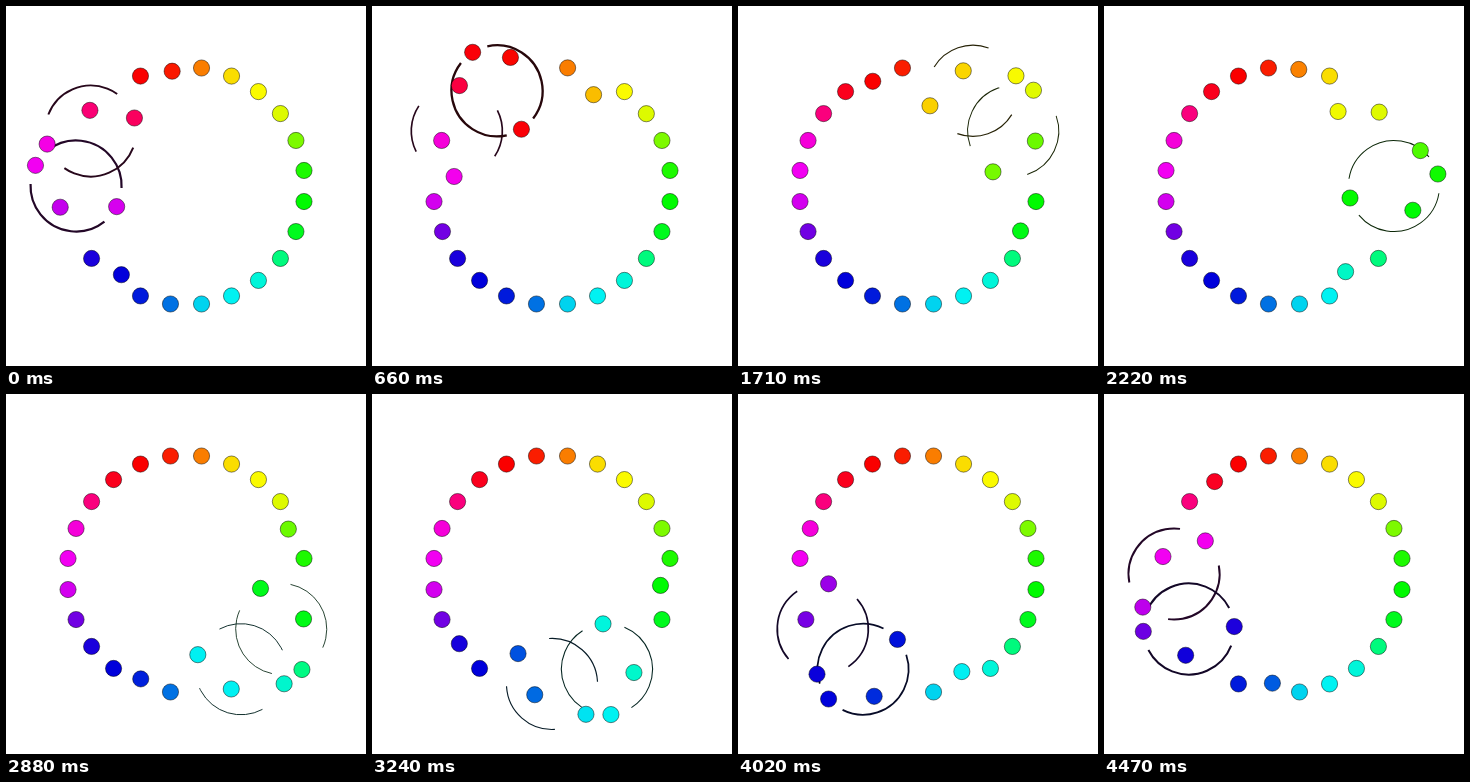
Write an HTML page with a canvas that moves like this. It is 360 by 360 pixels and loops after 4.5 s.

```html
<!DOCTYPE html>
<html lang="en">
<head>
<meta charset="utf-8">
<title>Swapping dots</title>
<style>
  html, body { margin: 0; width: 100%; height: 100%; overflow: hidden; background: #fff; }
  canvas { display: block; width: 360px; height: 360px; }
</style>
</head>
<body>
<canvas id="stage" width="360" height="360"></canvas>
<script>
const ctx = document.getElementById("stage").getContext("2d");

const LOOP = 4500, TICK = 30;
const CENTER = 180, RING = 119, DOT = 8.5;
const PAIRS = 12;
const STAGGER = 4470 / 11;      // delay between neighbouring pairs
const SWAP = 1733;              // time one pair takes to trade places
const LEAD = 0.5815 * SWAP;     // progress of the leftmost pair at time 0

const rad = degrees => degrees * Math.PI / 180;
const cosDeg = degrees => Math.cos(rad(degrees));
const sinDeg = degrees => Math.sin(rad(degrees));
const mod = (a, n) => ((a % n) + n) % n;
const easeInOut = u => u < 0.5 ? 2 * u * u : 1 - 2 * (1 - u) ** 2;

// Each pair sits 45° apart on the ring and turns about its midpoint.
const ORBIT = RING * cosDeg(22.5);
const RADIUS = RING * sinDeg(22.5);

function pairAt(index, time) {
  const angle = 180 + index * 360 / PAIRS;
  const elapsed = mod(time + LEAD - index * STAGGER, PAIRS * STAGGER);
  const progress = Math.min(elapsed / SWAP, 1);
  return {
    angle,
    progress,
    turn: easeInOut(progress),
    x: CENTER + ORBIT * cosDeg(angle),
    y: CENTER + ORBIT * sinDeg(angle)
  };
}

const heading = pair => pair.angle - 90 + 180 * pair.turn;

// Two arcs between the dots, longest halfway through the swap;
// they last longer and are heavier on the left of the ring.
function drawTrack(pair) {
  const reach = 0.2 + 0.06 * cosDeg(pair.angle - 165);
  const strength = 1 - Math.abs(pair.progress - 0.5) / reach;
  if (strength <= 0) return;
  const gap = 20 + 45 * (1 - strength) ** 2;
  const weight = 1.8 + 0.7 * cosDeg(pair.angle - 200);
  ctx.strokeStyle = `hsl(${mod(pair.angle - 247.5, 360)} 70% 9%)`;
  ctx.lineWidth = weight * (0.65 + 0.35 * strength);
  for (const side of [0, 180]) {
    const start = heading(pair) + side;
    ctx.beginPath();
    ctx.arc(pair.x, pair.y, RADIUS, rad(start + gap), rad(start + 180 - gap));
    ctx.stroke();
  }
}

// Hues lean towards the primaries and secondaries; blues are deeper.
function dotColor(wheel) {
  const hue = mod(wheel - 8 * sinDeg(6 * wheel), 360);
  const light = 49 - 6 * Math.max(0, cosDeg(hue - 240)) ** 2;
  return `hsl(${hue} 100% ${light}%)`;
}

function drawDot(x, y, wheel) {
  ctx.beginPath();
  ctx.arc(x, y, DOT - 0.4, 0, 2 * Math.PI);
  ctx.fillStyle = dotColor(wheel);
  ctx.fill();
  ctx.strokeStyle = "rgba(0, 0, 0, 0.6)";
  ctx.lineWidth = 0.8;
  ctx.stroke();
}

function drawDots(pair) {
  const dx = RADIUS * cosDeg(heading(pair));
  const dy = RADIUS * sinDeg(heading(pair));
  const shift = 45 * pair.turn;
  drawDot(pair.x + dx, pair.y + dy, pair.angle - 270 + shift);
  drawDot(pair.x - dx, pair.y - dy, pair.angle - 225 - shift);
}

function draw(time) {
  ctx.fillStyle = "#fff";
  ctx.fillRect(0, 0, 360, 360);
  const pairs = Array.from({ length: PAIRS }, (_, i) => pairAt(i, time));
  pairs.forEach(drawTrack);
  pairs.forEach(drawDots);
}

const begin = performance.now();
function frame() {
  const time = (performance.now() - begin) % LOOP;
  draw(Math.floor(time / TICK) * TICK);
  requestAnimationFrame(frame);
}
frame();
</script>
</body>
</html>
```
